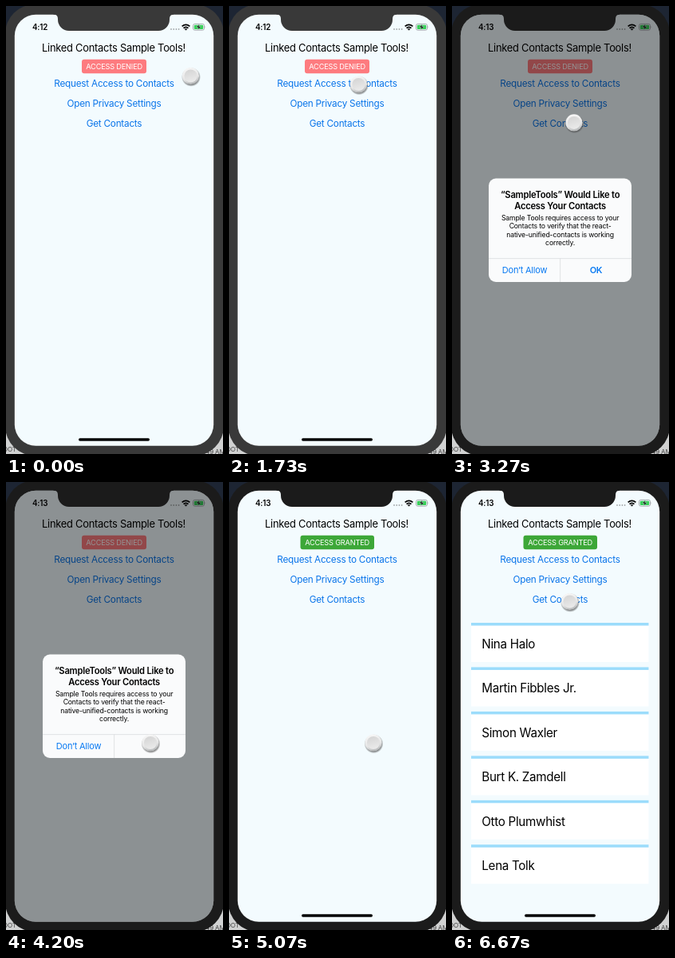
An HTML page that plays this animation: 272x560 px, repeating every 8 s.

```html
<!DOCTYPE html>
<html lang="en">
<head>
<meta charset="utf-8">
<style>
  html, body { margin: 0; width: 100%; height: 100%; overflow: hidden; background: #1d2533; }
  svg { display: block; width: 272px; height: 560px; }
  text { font-family: Inter, "Open Sans", sans-serif; letter-spacing: -.02em; }
  .mid { text-anchor: middle; }
  .title { font-size: 12.9px; }
  .badge { font-size: 9.2px; fill: #fff; }
  .link { font-size: 11.75px; fill: #0a75ea; }
  .name { font-size: 15.2px; }
  .clock { font-size: 9.8px; font-weight: 600; }
  .heading { font-size: 11.2px; font-weight: 600; }
  .message { font-size: 8.7px; }
  .action { font-size: 11px; fill: #0a7af2; }
  .tiny { font-size: 8px; fill: #444; }
</style>
</head>
<body>
<svg viewBox="0 0 272 560">
  <defs>
    <linearGradient id="rim" x2=".3" y2="1">
      <stop offset="0" stop-color="#fafafa"/>
      <stop offset=".7" stop-color="#e6e6e6"/>
      <stop offset="1" stop-color="#bdbfc0"/>
    </linearGradient>
    <linearGradient id="face" x2=".3" y2="1">
      <stop offset="0" stop-color="#d3d3d3"/>
      <stop offset="1" stop-color="#e9e9e9"/>
    </linearGradient>
    <radialGradient id="shade">
      <stop offset=".75" stop-color="#333" stop-opacity=".7"/>
      <stop offset="1" stop-color="#333" stop-opacity="0"/>
    </radialGradient>
  </defs>

  <rect width="272" height="560" fill="#1d2533"/>
  <rect y="300" width="272" height="260" fill="#d0d1d1"/>
  <text class="tiny" x="-4" y="557">OOT</text>
  <text class="tiny" x="248" y="560">:49 AM</text>
  <rect id="bezel" x="-1" y="-2" width="274" height="564" rx="37"/>
  <rect x="10.8" y="10.7" width="249.4" height="539" rx="26.5" fill="#f3fbfe"/>

  <text id="clock" class="clock" x="33" y="29.7"></text>
  <g fill="#a3a8aa">
    <circle cx="207" cy="29" r=".9"/><circle cx="210.2" cy="29" r=".9"/>
    <circle cx="213.4" cy="29" r=".9"/><circle cx="216.6" cy="29" r=".9"/>
  </g>
  <g fill="none" stroke="#000" stroke-width="1.7">
    <path d="M220.6 25.4Q225.5 21.2 230.4 25.4M222.5 27.6Q225.5 25 228.5 27.6"/>
    <path d="M224.3 28.8L225.5 30.2L226.7 28.8Z" stroke-width="1"/>
  </g>
  <rect x="234.5" y="22.4" width="14" height="7.8" rx="2.2" fill="none" stroke="#92999b" stroke-width=".8"/>
  <rect x="235.8" y="23.7" width="11.4" height="5.2" rx="1" fill="#35cf57"/>
  <path d="M249.6 25v2.6q1.2-1.3 0-2.6" fill="#92999b"/>
  <path d="M242.5 22.6L238.6 26.8H241.2L240.3 30L244.4 25.7H241.7Z" stroke="#f3fbfe" stroke-width=".4"/>

  <text class="mid title" x="135" y="56.8">Linked Contacts Sample Tools!</text>
  <rect id="badge" y="66.7" height="17.6" rx="3"/>
  <text id="badgeText" class="mid badge" x="135.6" y="79"></text>
  <text id="request" class="mid link" x="135.5" y="101.3">Request Access to Contacts</text>
  <text class="mid link" x="135.5" y="126.3">Open Privacy Settings</text>
  <text id="fetch" class="mid link" x="135.5" y="151.3">Get Contacts</text>
  <g id="list"></g>
  <rect id="indicator" x="91" y="540.3" width="89" height="3.4" rx="1.7" fill="#050505"/>

  <rect id="dim" x="10.8" y="10.7" width="249.4" height="539" rx="26.5"/>
  <path id="notch" d="M59 10L60 10.7Q65 10.7 65 16V17A14 14 0 0 0 79 31H191A14 14 0 0 0 205 17V16Q205 10.7 210 10.7V10Z"/>

  <g id="panel">
    <rect x="46" y="215.5" width="179" height="129.5" rx="9" fill="#fafbfc"/>
    <path d="M46 315.6H225M135.6 315.6V345" stroke="#d6dadc" stroke-width=".7"/>
    <g class="mid heading">
      <text x="135.6" y="239.6">“SampleTools” Would Like to</text>
      <text x="135.6" y="254">Access Your Contacts</text>
    </g>
    <g class="mid message">
      <text x="135.6" y="267.9">Sample Tools requires access to your</text>
      <text x="135.6" y="278.4">Contacts to verify that the react-</text>
      <text x="135.6" y="288.9">native-unified-contacts is working</text>
      <text x="135.6" y="299.4">correctly.</text>
    </g>
    <text class="mid action" x="91" y="334">Don’t Allow</text>
    <text class="mid action" x="180.5" y="334" font-weight="600">OK</text>
  </g>

  <g id="cursor">
    <circle cx=".5" cy="1.3" r="12" fill="url(#shade)"/>
    <circle r="10.6" fill="url(#rim)"/>
    <circle r="8" fill="url(#face)"/>
  </g>
</svg>
<script>
const LOOP = 8000;
const el = id => document.getElementById(id);
const set = (id, attrs) => {
  for (const key in attrs) el(id).setAttribute(key, attrs[key]);
};
const ramp = (t, from, to) => Math.min(1, Math.max(0, (t - from) / (to - from)));
const easeOut = u => 1 - (1 - u) ** 3;
const smooth = u => u * u * (3 - 2 * u);

const contacts = ["Nina Halo", "Martin Fibbles Jr.", "Simon Waxler",
  "Burt K. Zamdell", "Otto Plumwhist", "Lena Tolk"];
el("list").innerHTML = contacts.map((name, i) => `
  <g transform="translate(24 ${176 + i * 55.45})">
    <rect width="222.5" height="49" fill="#fff"/>
    <rect width="222.5" height="3.5" fill="#9bdcfb"/>
    <text class="name" x="13.3" y="32">${name}</text>
  </g>`).join("");

// Pointer path: time, x, y
const path = [
  [0, 231.5, 87.5], [70, 231.5, 87.5], [450, 208, 80.5], [870, 185, 85],
  [1470, 165, 99], [1730, 162.5, 98], [2000, 162.5, 96.5], [3130, 162.5, 96.5],
  [3200, 160, 107], [3270, 153, 145.5], [3500, 147, 230], [4000, 181, 326],
  [5280, 181, 326], [5480, 183, 300], [5750, 165, 200], [6000, 147.5, 149.5],
  [LOOP, 147.5, 149.5]
];

// Slope through a path point; zero where the pointer rests or turns.
function slope(i, axis) {
  const a = path[i - 1], b = path[i], c = path[i + 1];
  if (!a || !c || (b[axis] - a[axis]) * (c[axis] - b[axis]) <= 0) return 0;
  return (c[axis] - a[axis]) / (c[0] - a[0]);
}

function pointer(t, axis) {
  const i = path.findIndex(p => p[0] > t) - 1;
  const a = path[i], b = path[i + 1], span = b[0] - a[0], u = (t - a[0]) / span;
  const s = smooth(u);
  return a[axis] * (1 - s) + b[axis] * s +
    span * u * (1 - u) * ((1 - u) * slope(i, axis) - u * slope(i + 1, axis));
}

const linkOpacity = (t, press) =>
  1 - .8 * (ramp(t, press, press + 80) - ramp(t, press + 150, press + 400));

function draw(t) {
  const body = t < 2400 ? "#393939" : "#1b1b1b";
  set("bezel", { fill: body });
  set("notch", { fill: body });
  el("clock").textContent = t < 1930 ? "4:12" : "4:13";

  const granted = t >= 4800;
  set("badge", granted
    ? { x: 89.5, width: 92.5, fill: "#3da738" }
    : { x: 95, width: 81, fill: "#fd7b7f" });
  el("badgeText").textContent = granted ? "ACCESS GRANTED" : "ACCESS DENIED";

  set("request", { opacity: linkOpacity(t, 2400) });
  set("fetch", { opacity: linkOpacity(t, 6200) });
  set("list", { visibility: t >= 6400 ? "visible" : "hidden" });

  // The home indicator fades away while the alert is up.
  const opened = easeOut(ramp(t, 2615, 3115));
  const closed = smooth(ramp(t, 4440, 4850));
  const shown = opened * (1 - closed);
  const scale = 1.2 - .2 * opened;
  set("dim", { opacity: .425 * shown });
  set("indicator", { opacity: 1 - shown });
  set("panel", {
    opacity: shown,
    transform: `translate(135.6 280.2) scale(${scale}) translate(-135.6 -280.2)`
  });
  set("cursor", { transform: `translate(${pointer(t, 1)} ${pointer(t, 2)})` });
}

const start = performance.now();
function tick() {
  draw((performance.now() - start) % LOOP);
  requestAnimationFrame(tick);
}
tick();
</script>
</body>
</html>
```
